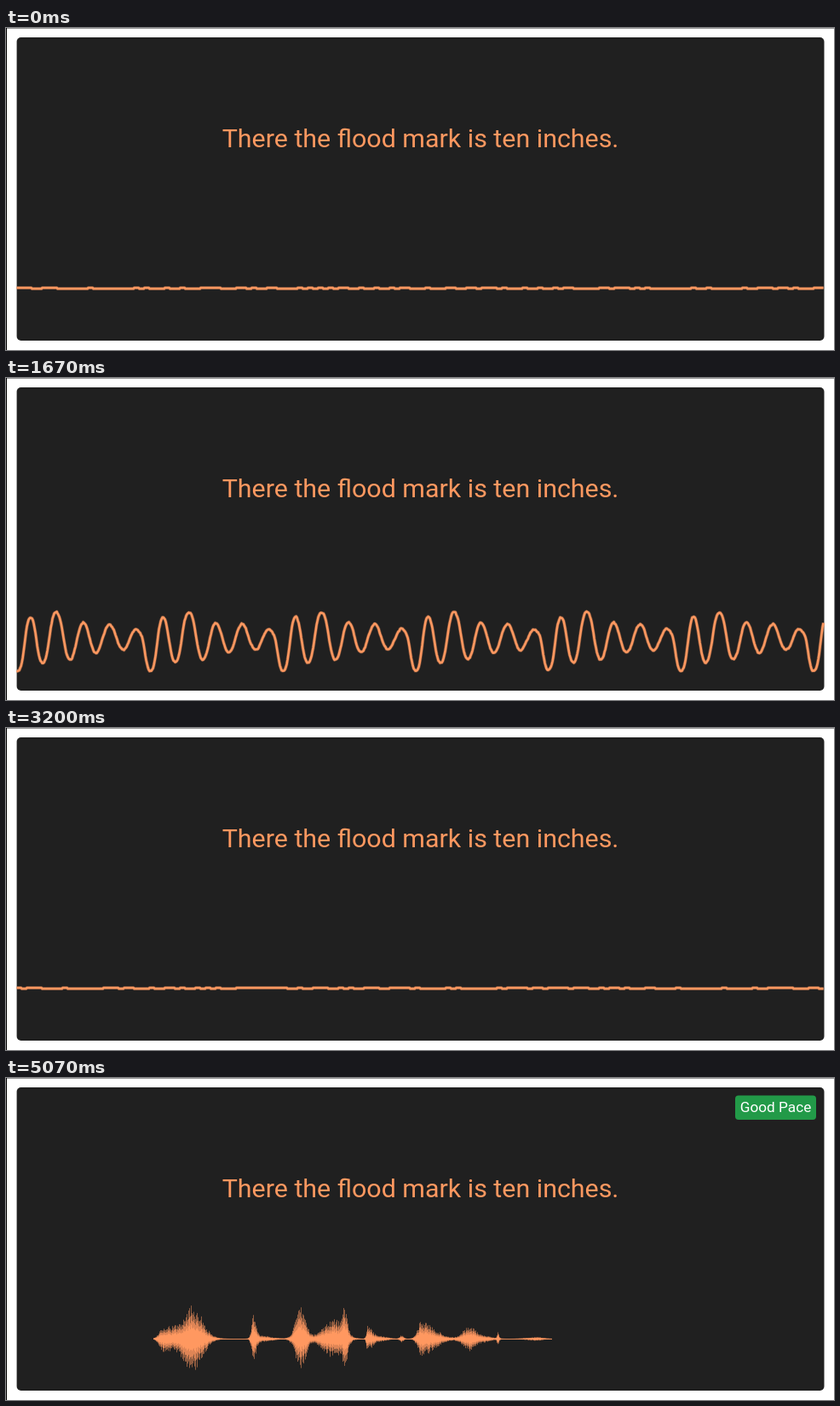
An HTML page with a canvas for the animation above (6.87 s loop, 972 by 378 pixels).

```html
<!DOCTYPE html>
<html lang="en">
<head>
<meta charset="utf-8">
<style>
  html, body { margin: 0; width: 100%; height: 100%; overflow: hidden; background: #fff; }
  canvas { display: block; }
</style>
</head>
<body>
<canvas id="stage" width="972" height="378"></canvas>
<script>
const ctx = document.getElementById('stage').getContext('2d');
const LOOP = 6870, RESULT_AT = 5070, LAST_STEP = 74;
const LEFT = 12.6, RIGHT = 960.5, TOP = 11, HEIGHT = 356, MID = 306, ORANGE = '#ff9860';
const SPEECH_START = 173, SPEECH_END = 640;

// Syllables of the recording: [peak x, height, attack, release]
const syllables = [
  [185, 16, 7, 25], [219, 38, 14, 16], [290, 28, 3, 4], [298, 4, 8, 16], [346, 37, 9, 8],
  [385, 24, 18, 14], [397, 28, 3, 5], [424, 15, 2, 8], [440, 3, 8, 10], [464, 4, 3, 3],
  [487, 21, 6, 22], [544, 15, 11, 9], [560, 4, 10, 12], [577, 7, 1.5, 2], [622, 2, 14, 10]
];

// Each voice is a train of pulses ringing through damped formants:
// [height, wavelength, first crest, decay]
const voices = [
  { step: 12, until: 19, start: 33, period: 170, chirp: 2e-7, limit: 18,
    formants: [[16, 70, 34, 90], [17, 30, 19, 60]],
    fuzz: (x, pos) => pos > 145 || pos < 6 ? Math.min(13, 2 + x / 40) : 2 },
  { step: 25, until: 30, start: 13, period: 155.7, chirp: 0, limit: 45,
    formants: [[50, 31.1, 15.5, 95], [22, 60, 43, 40]],
    fuzz: () => 1 },
  { step: 35, until: 38, start: -35, period: 173, chirp: 0, limit: 20,
    formants: [[28, 66, 32, 60], [24, 31, 16, 60]],
    fuzz: () => 2 },
  { step: 41, until: 99, start: 68, period: 86, chirp: 0, limit: 25, fade: 0.5,
    formants: [[16, 86, 0, Infinity]],
    fuzz: x => (4 + 9 * Math.sin(x / 13 + 2.6) ** 2) * Math.max(0.3, 1 - x / 900) }
];

const mod = (a, b) => ((a % b) + b) % b;
const random = n => mod(Math.sin(n * 12.9898 + 4.1) * 43758.5453, 1);

const loudness = x => syllables.reduce((sum, [peak, height, attack, release]) =>
  sum + height * Math.exp(-(((x - peak) / (x < peak ? attack : release)) ** 2)), 0);

const loudAt = step => loudness(181 + (step - 11) * 12.5);

function ring({ formants, limit }, pos) {
  const sum = formants.reduce((y, [height, length, crest, decay]) =>
    y - height * Math.exp(-pos / decay) * Math.cos(2 * Math.PI * (pos - crest) / length), 0);
  return limit * Math.tanh(sum / limit);
}

// The end of a period runs smoothly into the next pulse
function pulse(voice, pos) {
  const attack = voice.period * 0.06;
  const k = Math.max(0, 1 - (voice.period - pos) / attack);
  const mix = k * k * (3 - 2 * k);
  return ring(voice, pos) * (1 - mix) + ring(voice, 0) * mix;
}

function drawScope(step) {
  const voice = voices.find(v => step < v.until);
  const { start, period, chirp, fade = 0, fuzz } = voice;
  const gain = Math.min(1.4, loudAt(step) / loudAt(voice.step));
  const shift = mod((step - voice.step) * 0.618, 1) * period;
  ctx.beginPath();
  for (let x = LEFT; x <= RIGHT; x++) {
    const u = x - start - shift;
    const pos = mod(u / period + chirp * u * u, 1) * period;
    const noise = (random(x + step * 977) - 0.5) * fuzz(x, pos);
    const ripple = random(Math.floor(x / 6) + step * 131) > 0.6 ? -1 : 0;
    ctx.lineTo(x, MID + ripple + gain * (pulse(voice, pos) * (1 - fade * x / RIGHT) + noise));
  }
  ctx.lineJoin = 'round';
  ctx.strokeStyle = ORANGE;
  for (const [width, alpha] of [[4, 0.35], [2.6, 1]]) {
    ctx.lineWidth = width;
    ctx.globalAlpha = alpha;
    ctx.stroke();
  }
  ctx.globalAlpha = 1;
}

function drawRecording() {
  ctx.fillStyle = ORANGE;
  for (let x = SPEECH_START; x <= SPEECH_END; x++) {
    const height = loudness(x);
    for (const [reach, alpha] of [[1, 0.5], [0.7, 0.7], [0.42, 1]]) {
      const up = height * reach * (0.6 + 0.4 * random(x));
      const down = height * reach * (0.55 + 0.4 * random(x + 700));
      ctx.globalAlpha = alpha;
      ctx.fillRect(x, MID - up, 1, up + down + 0.6);
    }
  }
  ctx.globalAlpha = 1;
}

function box(x, y, w, h, radius, color) {
  ctx.fillStyle = color;
  ctx.beginPath();
  ctx.roundRect(x, y, w, h, radius);
  ctx.fill();
}

function label(text, x, y, size, color) {
  ctx.font = `${size}px Roboto, sans-serif`;
  ctx.textAlign = 'center';
  ctx.fillStyle = color;
  ctx.fillText(text, x, y);
}

function draw(time) {
  box(0, 0, 972, 378, 0, '#fff');
  box(0, 0, 972, 1, 0, '#999');
  box(0, 0, 1, 378, 0, '#000');
  box(LEFT, TOP, RIGHT - LEFT, HEIGHT, 5, '#202020');
  label('There the flood mark is ten inches.', (LEFT + RIGHT) / 2, 139.5, 30.4, ORANGE);
  if (time >= RESULT_AT) {
    drawRecording();
    box(856, 20.5, 95, 28.5, 4, '#229a48');
    label('Good Pace', 903.5, 40, 17.2, '#fff');
  } else {
    drawScope(Math.min(LAST_STEP, Math.floor((time + 7) * 0.015)));
  }
}

const begin = performance.now();
function tick() {
  draw((performance.now() - begin) % LOOP);
  requestAnimationFrame(tick);
}
tick();
</script>
</body>
</html>
```
